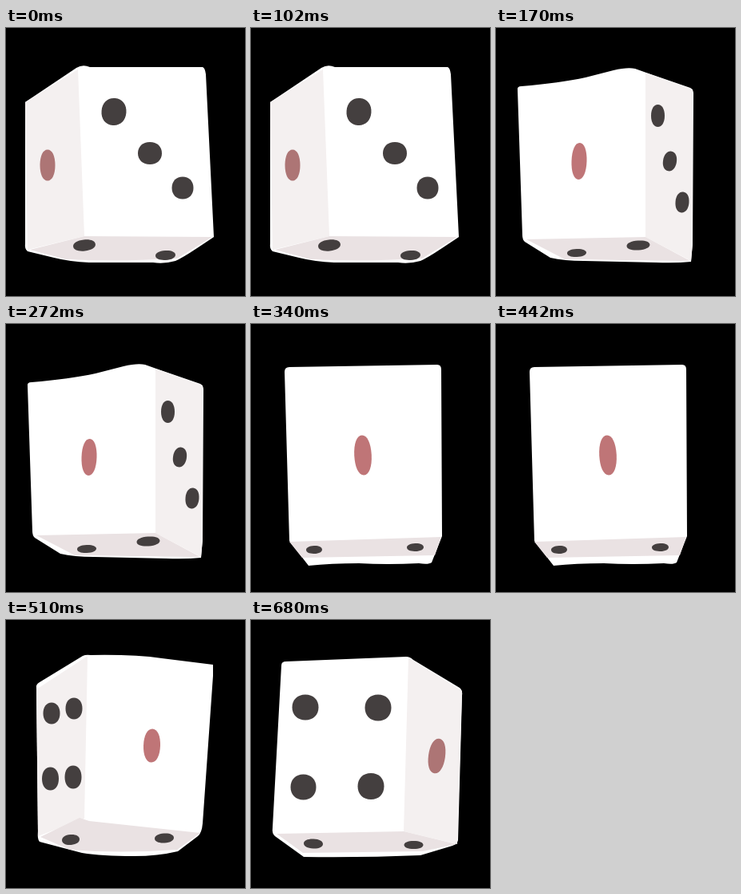
An HTML page for the animation above (0.81 s loop, 299 by 336 pixels).

```html
<!DOCTYPE html>
<html lang="en">
<head>
<meta charset="utf-8">
<title>Rolling die</title>
<style>
html, body { margin: 0; width: 100%; height: 100%; overflow: hidden; background: #000; }
svg { display: block; width: 100vw; height: 100vh; }
</style>
</head>
<body>
<svg id="stage" viewBox="0 0 299 336"></svg>
<script>
const INK = '#443f3f', RED = '#bf7577', SHADED_RED = '#ad7575';
const SIDE = '#f4f0f0', BASE = '#eae2e3';
const LOOP = 810;

// pips: [cx, cy, rx, ry, tilt]
const poses = [
  {
    at: 0,
    body: 'M24 93L88 50Q96 45 105 49L246 49Q249 50 250 58L260 262L239 276Q221 288 212 292Q198 296 184 294L104 294Q80 293 60 288L27 280Q23 277 24 270Z',
    side: 'M24 93L90 52L98 261L27 278Z',
    base: 'M30 278L98 261L258 262L214 289Q140 293 75 290Z',
    pips: [[135, 105, 15.5, 17, 5], [180, 157, 15, 14, 0], [221, 200.5, 13.5, 14, 0],
           [98, 272.5, 14, 7, -6], [199.5, 285, 12.5, 6, -4]],
    one: [52, 172, 9.5, 19.5, 0], red: SHADED_RED
  },
  {
    at: 170,
    body: 'M27 78Q26 73 32 73Q80 69 112 62L147 53Q164 49 174 51L188 56L243 75Q247 77 247 82L246 270L244 293Q225 295 200 294L110 292Q85 292 68 288L36 268Q33 265 33 260Z',
    side: 'M187 56L246 77L246 270L244 292L187 262Z',
    base: 'M38 265L187 262L243 292L86 290Z',
    pips: [[202.5, 110, 8.5, 14, 0], [217.5, 167, 8.5, 12.5, 10], [233, 218.5, 8.5, 13, 5],
           [101, 282, 12, 5, -2], [178, 272.5, 14.5, 6, -4]],
    one: [104, 167, 9.5, 23, 2], red: RED
  },
  {
    at: 340,
    body: 'M42 60Q42 54 48 54L233 51Q238 51 238 57L239 266L226 299Q222 302 210 300Q170 302 135 300Q100 300 72 303L48 272Z',
    base: 'M48 273L238 267L230 290L64 293Z',
    pips: [[79, 283, 10, 5, -2], [205.5, 280, 10.5, 5, -2]],
    one: [140, 164.5, 10.8, 25, -3], red: RED
  },
  {
    at: 510,
    body: 'M38 85Q37 81 42 78L96 45Q100 43 106 44Q160 43 195 48L259 56L259 70L246 255Q245 267 240 271L215 290Q190 296 160 296Q120 296 95 292L42 278Q39 275 40 265Z',
    side: 'M38 87L102 45L98 249L40 271Z',
    base: 'M43 272L92 248L104 252L243 267L214 288Q140 293 80 288Z',
    pips: [[57, 117, 10.5, 13.5, 0], [85, 111, 10.5, 13.5, 0], [55.5, 199, 10.5, 14.5, 0],
           [84, 197, 10.5, 14.5, 0], [81, 275.5, 11, 6.5, -5], [198, 273.5, 12, 6, -4]],
    one: [182.5, 157.5, 10.5, 21, 2], red: RED
  },
  {
    at: 680,
    body: 'M38 57Q38 52 44 52L194 46Q199 46 203 50L261 85Q265 88 264 95L259 276Q258 281 252 283L212 295Q140 298 66 297L30 271Q26 268 27 260Z',
    side: 'M197 47L264 89L258 281L191 265Z',
    base: 'M32 268L191 265L257 281L215 290L65 292Z',
    pips: [[68, 109.5, 16.5, 16, 0], [159, 110, 16.5, 16.5, 0], [65.5, 209.5, 16, 16, 0],
           [150, 208.5, 16.5, 16.5, 0], [78, 280.5, 12, 6, 2], [203.5, 282, 12, 5, 0]],
    one: [232.5, 170.5, 10.5, 22, 8], red: SHADED_RED
  }
];

const stage = document.getElementById('stage');

function add(parent, tag, attrs = {}) {
  const el = document.createElementNS('http://www.w3.org/2000/svg', tag);
  for (const key in attrs) el.setAttribute(key, attrs[key]);
  return parent.appendChild(el);
}

// Superellipse outline, slightly squarer than an ellipse
function pip(parent, [cx, cy, rx, ry, tilt], fill) {
  const k = 0.6, kx = rx * k, ky = ry * k;
  const d = `M0 ${-ry}C${kx} ${-ry} ${rx} ${-ky} ${rx} 0S${kx} ${ry} 0 ${ry}` +
            `S${-rx} ${ky} ${-rx} 0S${-kx} ${-ry} 0 ${-ry}Z`;
  add(parent, 'path', { d, fill, transform: `translate(${cx} ${cy}) rotate(${tilt})` });
}

const groups = poses.map(({ body, side, base, pips, one, red }) => {
  const g = add(stage, 'g', { visibility: 'hidden' });
  add(g, 'path', { d: body, fill: '#fff' });
  if (side) add(g, 'path', { d: side, fill: SIDE });
  add(g, 'path', { d: base, fill: BASE });
  pips.forEach(p => pip(g, p, INK));
  pip(g, one, red);
  return g;
});

let shown = -1;
function show(now) {
  const t = now % LOOP;
  const next = poses.findLastIndex(p => p.at <= t);
  if (next !== shown) {
    groups.forEach((g, i) => g.setAttribute('visibility', i === next ? 'visible' : 'hidden'));
    shown = next;
  }
}

const start = performance.now();
function tick() {
  show(performance.now() - start);
  requestAnimationFrame(tick);
}
tick();
</script>
</body>
</html>
```
